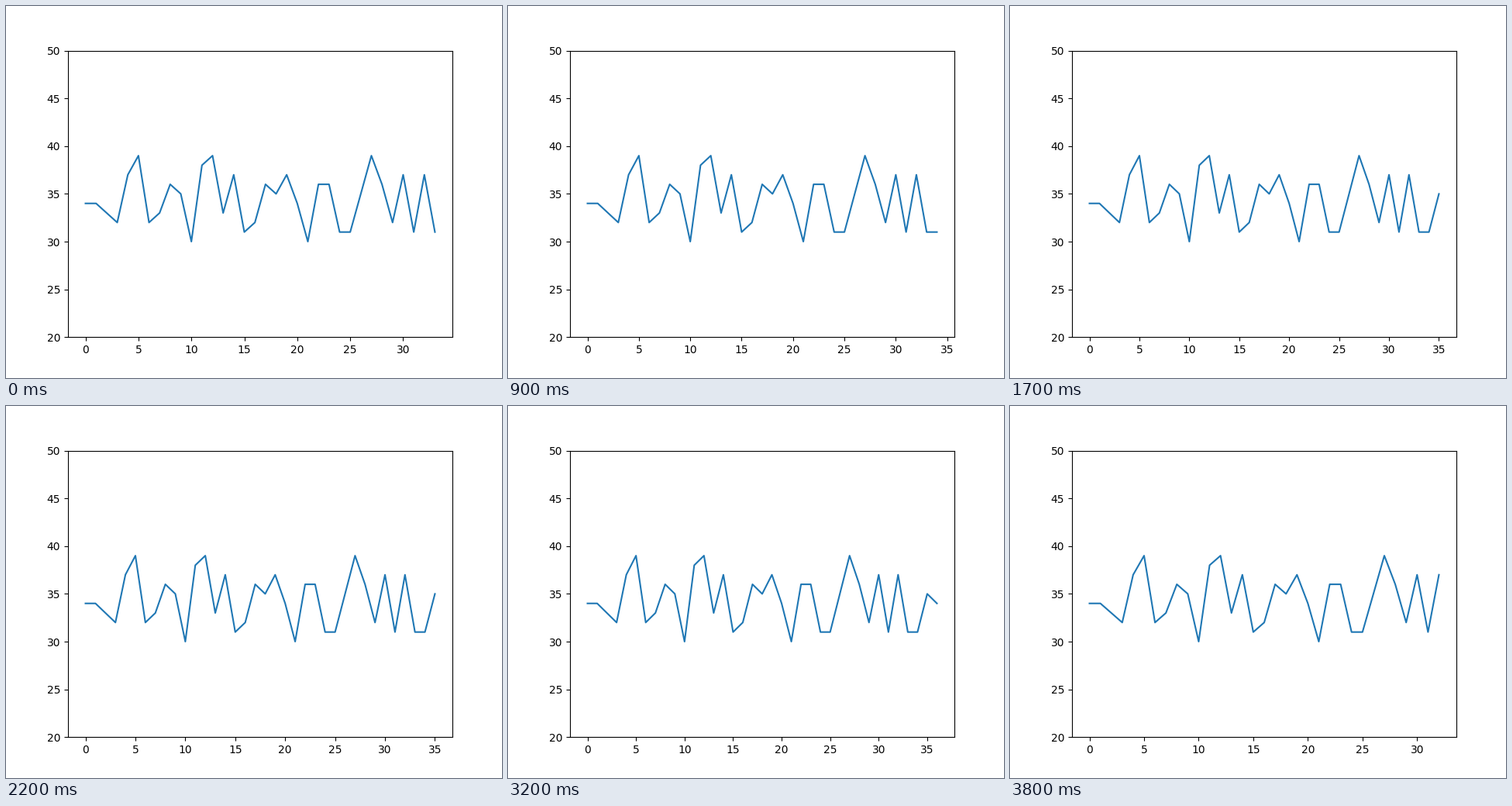
A matplotlib script for the animation above (4 s loop, 640 by 480 pixels).

```python
import matplotlib.pyplot as plt
from matplotlib.animation import FuncAnimation

plt.rcParams["text.kerning_factor"] = 6  # whole-pixel digit spacing

# Sensor-like readings: irregular data, so they are stated as they are.
# Each one also sets how many points its own frame shows.
READINGS = [34, 34, 33, 32, 37, 39, 32, 33, 36, 35,
            30, 38, 39, 33, 37, 31, 32, 36, 35, 37,
            34, 30, 36, 36, 31, 31, 35, 39, 36, 32,
            37, 31, 37, 31, 31, 35, 34, 39, 33, 33]

fig, ax = plt.subplots(figsize=(6.4, 4.8), dpi=100)


def draw(i):
    count = READINGS[i]
    ax.clear()
    ax.set_ylim(20, 50)
    return ax.plot(READINGS[:count])


anim = FuncAnimation(fig, draw, frames=len(READINGS), init_func=lambda: draw(0),
                     interval=100, repeat=True, repeat_delay=0, blit=False)
plt.show()
```
